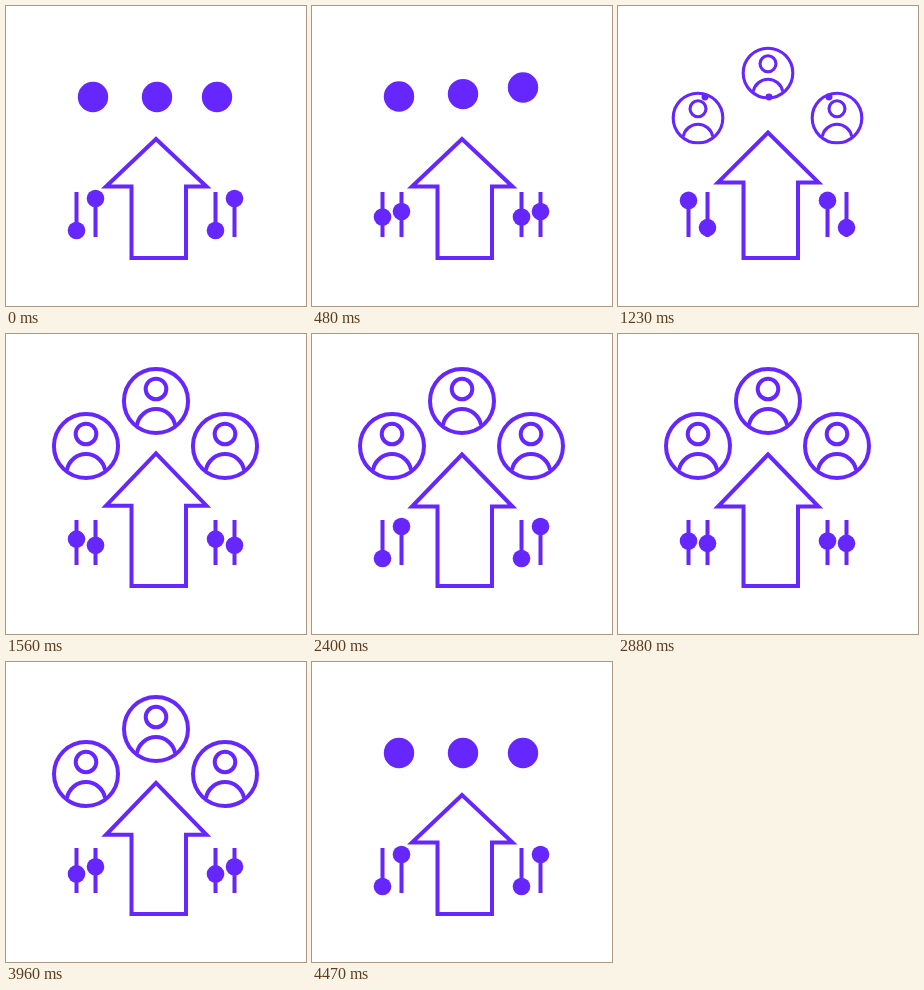
Recreate the animation shown at these times as an HTML page. Size 300 by 300 pixels, loop 4500 ms.

```html
<!DOCTYPE html>
<html lang="en">
<head>
<meta charset="utf-8">
<title>Upward arrow with team</title>
<style>
  html, body { margin: 0; width: 100%; height: 100%; overflow: hidden; background: #fff; }
  svg { display: block; width: 100vw; height: 100vh; }
</style>
</head>
<body>
<svg viewBox="0 0 300 300" fill="none" stroke="#6627ff" stroke-width="4">
  <defs>
    <g id="person">
      <circle r="32"/>
      <circle cy="-12" r="10.3"/>
      <path d="M-19 24A19.3 19.3 0 0 1 19 24"/>
    </g>
  </defs>
  <path d="M70.5 186V231M89.5 186V231M209.5 186V231M228.5 186V231"/>
  <path id="arrow"/>
  <g id="people"></g>
  <g id="solids" fill="#6627ff" stroke="none"></g>
</svg>
<script>
const LOOP = 4500;
const $ = id => document.getElementById(id);

function add(parent, tag, attrs) {
  const el = document.createElementNS('http://www.w3.org/2000/svg', tag);
  for (const k in attrs) el.setAttribute(k, attrs[k]);
  return parent.appendChild(el);
}

const seats = [[80, 112], [150, 67], [219, 112]];
const people = seats.map(() => add($('people'), 'use', { href: '#person' }));
const dots = [87, 151, 211].map(cx => add($('solids'), 'circle', { cx }));
const knobs = [70.5, 89.5, 209.5, 228.5].map(cx => add($('solids'), 'circle', { cx, r: 8.8 }));

const ramp = (t, from, to) => Math.min(1, Math.max(0, (t - from) / (to - from)));
const smooth = x => x * x * (3 - 2 * x);
const backIn = (x, s) => x * x * ((s + 1) * x - s);
const backOut = (x, s) => 1 - backIn(1 - x, s);

// Rises with an overshoot, then leaves the same way in reverse.
const visit = (t, inFrom, inTo, outFrom, outTo, s) =>
  backOut(ramp(t, inFrom, inTo), s) - backIn(ramp(t, outFrom, outTo), s);

// Two soft hops per dot, each dot a quarter of a hop later.
function hop(t, i) {
  const u = ramp(t, i * 112.5, i * 112.5 + 900);
  return 5 * (1 - Math.cos(4 * Math.PI * u));
}

function draw(t) {
  const lift = visit(t, 1125, 1945, 3420, 4240, 1.70158);
  const tip = 133 - 12.5 * lift, neck = 180.5 - 8 * lift;
  $('arrow').setAttribute('d',
    `M180 254V${neck}H200.5L150 ${tip}L100 ${neck}H125.5V252H180`);

  const slide = smooth(ramp(t, 30, 1005)) - smooth(ramp(t, 1165, 2135))
    + smooth(ramp(t, 2385, 3290)) - smooth(ramp(t, 3425, 4385));
  knobs.forEach((k, i) =>
    k.setAttribute('cy', i % 2 ? 192.5 + 29.5 * slide : 224.5 - 30.5 * slide));

  const size = Math.max(0, visit(t, 1110, 1580, 3970, 4440, 1.3));
  people.forEach((p, i) => {
    p.setAttribute('transform', `translate(${seats[i]}) scale(${size})`);
    p.setAttribute('visibility', size > 0 ? 'visible' : 'hidden');
  });

  const dotSize = 1 - smooth(ramp(t, 1100, 1290)) + smooth(ramp(t, 4270, 4460));
  dots.forEach((d, i) => {
    d.setAttribute('cy', 91 - hop(t, i));
    d.setAttribute('r', 15.2 * dotSize);
  });
}

const start = performance.now();
function frame() {
  draw((performance.now() - start) % LOOP);
  requestAnimationFrame(frame);
}
frame();
</script>
</body>
</html>
```
